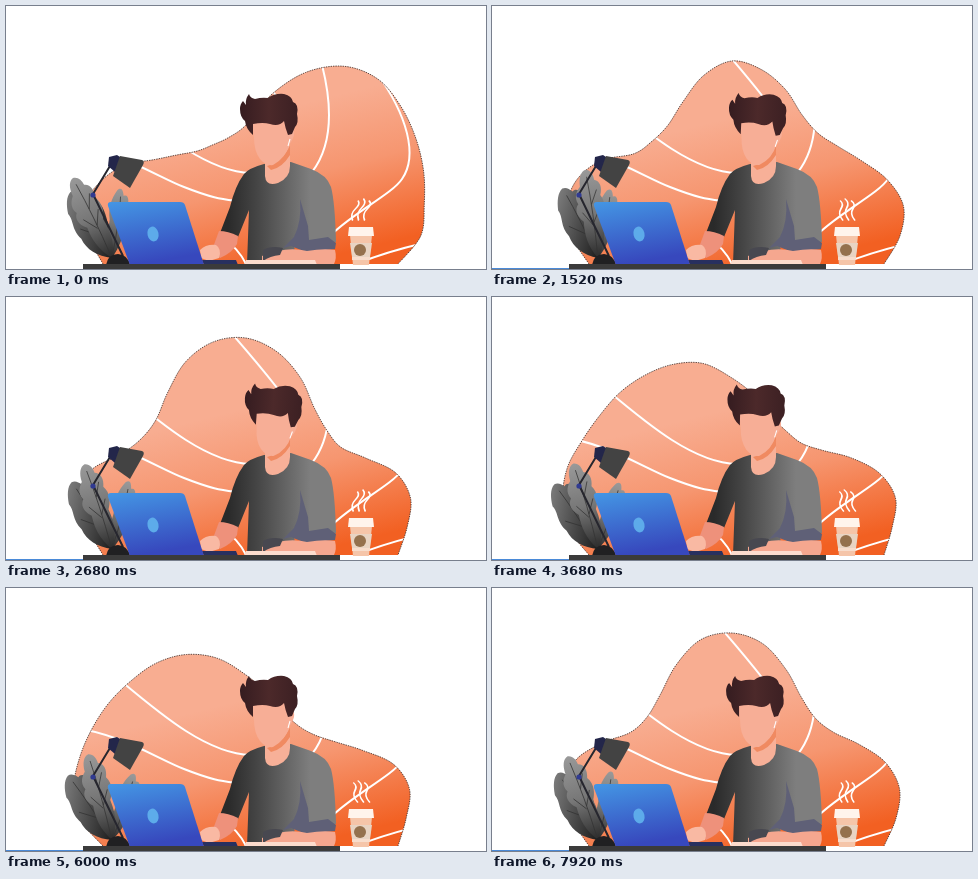
Recreate the animation shown at these times as an HTML page. Size 480x263 px, loop 8000 ms.

```html
<!DOCTYPE html>
<html lang="en">
<head>
<meta charset="utf-8">
<title>Working at a desk</title>
<style>
html, body { margin: 0; width: 100%; height: 100%; overflow: hidden; background: #fff; }
svg { display: block; width: 480px; height: 263px; }
.lines { fill: none; stroke: #fff; stroke-width: 2; }
.vein { fill: none; stroke: #333; stroke-width: .7; }
</style>
</head>
<body>
<svg viewBox="0 0 480 263">
  <defs>
    <linearGradient id="sky" gradientUnits="userSpaceOnUse" x1="225" y1="115" x2="262" y2="266">
      <stop offset="0" stop-color="#f8ad91"/><stop offset=".45" stop-color="#f69670"/><stop offset="1" stop-color="#f26022"/>
    </linearGradient>
    <linearGradient id="shirt" gradientUnits="userSpaceOnUse" x1="222" y1="0" x2="304" y2="0">
      <stop offset="0" stop-color="#2a2a2a"/><stop offset=".35" stop-color="#454545"/><stop offset="1" stop-color="#7e7e7e"/>
    </linearGradient>
    <linearGradient id="screen" x1="0" y1="0" x2=".25" y2="1">
      <stop offset="0" stop-color="#4496e4"/><stop offset="1" stop-color="#3748bd"/>
    </linearGradient>
    <linearGradient id="hair">
      <stop offset="0" stop-color="#351c20"/><stop offset=".5" stop-color="#4c292a"/><stop offset="1" stop-color="#3c2023"/>
    </linearGradient>
    <linearGradient id="dark" x1="0" y1="0" x2=".5" y2="1">
      <stop offset="0" stop-color="#8a8a8a"/><stop offset="1" stop-color="#1e1e1e"/>
    </linearGradient>
    <linearGradient id="light" x1="0" y1="0" x2="0" y2="1">
      <stop offset="0" stop-color="#999"/><stop offset=".5" stop-color="#777"/><stop offset="1" stop-color="#2a2a2a"/>
    </linearGradient>
    <clipPath id="clip"><path id="mask"/></clipPath>
  </defs>

  <g clip-path="url(#clip)">
    <rect width="480" height="258" fill="url(#sky)"/>
    <g class="lines">
      <path d="M98 79C140 113 195 166 245 167H258"/>
      <path d="M60 139C110 143 150 170 178 181S215 193 230 195"/>
      <path d="M220 30Q250 64 272 92"/>
      <path d="M315 55C327 100 326 140 306 166"/>
      <path d="M370 66C402 110 412 150 396 173C386 188 350 205 326 228"/>
      <path d="M340 262Q375 247 418 237"/>
      <path d="M215 230Q233 243 240 258"/>
    </g>
  </g>
  <path id="edge" fill="none" stroke="#3a2723" stroke-width=".8" stroke-dasharray="1.4 1"/>

  <g id="left">
    <path fill="url(#dark)" d="M106 252C94 243 88 232 89 220C85 207 92 200 90 192C93 183 97 176 103 174C107 174 109 177 111 181C116 178 121 186 120 194C126 200 122 213 119 222C119 236 113 246 106 252Z"/>
    <path class="vein" d="M106 250Q106 205 104 182M106 222L117 205M106 226L93 211"/>
  </g>
  <g id="right">
    <path fill="url(#light)" d="M106 252C97 238 99 226 99 214C96 203 98 193 103 184C107 180 109 184 110 189C115 186 117 195 114 203C118 214 114 238 106 252Z"/>
    <path class="vein" d="M106 250Q109 212 107 190"/>
  </g>
  <g id="mid">
    <path fill="url(#light)" d="M106 252C97 238 96 226 97 214C90 207 90 200 94 196C90 188 95 182 98 179C98 170 101 164 106 163C111 164 113 169 113 174C119 176 120 183 117 190C122 198 119 207 115 213C117 231 114 241 106 252Z"/>
    <path class="vein" d="M106 250Q108 206 106 170M107 216L115 202M106 219L97 205M107 198L114 184"/>
  </g>

  <path d="M107 155L87 188L117 250" fill="none" stroke="#26262e" stroke-width="2"/>
  <path d="M103 151L111 149L117 153L109 166L102 160Z" fill="#23264a"/>
  <path d="M114 150L136 154Q139 155 137 159L124 182L107 170Z" fill="#434343"/>
  <circle cx="87" cy="189" r="2.6" fill="#303a91"/>
  <path d="M100 259Q102 248 112 248Q122 249 124 259Z" fill="#202022"/>

  <path fill="url(#shirt)" d="M258 158Q243 162 238 168Q229 180 224 201L214 227L232 231L243 204L241 258H290L288 238L330 236Q329 196 325 181Q321 169 305 163L285 156Z"/>
  <path fill="#5f6077" d="M294 193L302 220L303 234L322 231L330 237L329 243L300 246L285 240L277 242L288 231Q296 215 294 193Z"/>
  <path fill="#f7b098" d="M259 149L284 138V160Q284 172 272 177Q260 181 259 170Z"/>
  <path fill="#f08a61" d="M261 160Q277 156 284 139V149Q276 162 265 164Z"/>

  <g id="head">
    <path fill="#f7ae96" d="M246 115L282 113L284 124Q289 121 288 129Q286 136 283 138Q280 152 267 159Q260 160 254 153Q248 145 248 132Z"/>
    <path fill="url(#hair)" d="M234 103Q234 98 237 95L240 99Q239 93 243 88Q244 92 249 93Q256 91 262 92Q269 87 278 88Q286 90 287 96Q293 98 291 108Q293 117 289 121L286 128L282 129Q279 121 278 115Q273 121 264 118Q257 116 247 118L247 129Q240 123 239 115Q234 111 234 103Z"/>
    <path d="M284 133L282 140" stroke="#fff" stroke-width="1"/>
  </g>

  <path fill="#ee917b" d="M213 225Q222 225 232 230L231 238Q226 247 214 252L206 244Z"/>
  <path fill="#f9b9a3" d="M194 244Q200 238 210 239Q216 243 213 252L203 255L195 252Z"/>
  <path fill="#f5a78f" d="M256 250Q280 240 301 245Q318 242 329 244Q331 252 328 258H292L256 256Z"/>
  <path fill="#484850" d="M257 244Q265 239 277 242L274 249Q264 250 257 255Z"/>
  <path fill="#fcdccd" d="M240 254H309L311 259H238Z"/>
  <path fill="#28305f" d="M196 254H230L232 259H198Z"/>
  <path fill="url(#screen)" d="M105 196H174Q178 196 179 199L198 259H124L102 200Q101 196 105 196Z"/>
  <ellipse cx="147" cy="228" rx="5.5" ry="7.5" fill="#5dabea" transform="rotate(-12 147 228)"/>

  <path fill="#f5c5a9" d="M344 229H366L363 259H347Z"/>
  <path fill="#e8d4c3" d="M344 237H366L364 251H346Z"/>
  <path fill="#fff4ec" d="M343 221H367L368 230H342Z"/>
  <path fill="#f8ddcc" d="M346 251H364V254H346Z"/>
  <circle cx="354" cy="244" r="6" fill="#94714d"/>
  <g id="steam" fill="none" stroke="#fff" stroke-width="1.6" stroke-linecap="round">
    <path d="M349 214Q345 208 349 203T350 195"/>
    <path d="M355 214Q351 207 355 202T355 193"/>
    <path d="M361 214Q357 208 361 203T361 195"/>
  </g>

  <rect x="77" y="258" width="257" height="5" fill="#3b3b3b"/>
  <rect id="bar" y="262" width="77" height="1" fill="#4a8ad8"/>
</svg>
<script>
const LOOP = 8000, HALF = 5000, CX = 240, CY = 230;
const $ = id => document.getElementById(id);

// Time, then radii from 170 down to 10 degrees.
const shapes = [
  [0,    165,156,141,119,106, 98, 97,100,111,143,174,196,205,202,196,189,181],
  [1520, 168,165,151,128,124,128,143,163,175,169,156,140,134,139,150,165,174],
  [2080, 168,167,150,133,132,143,163,181,185,177,158,139,130,133,147,163,170],
  [2500, 167,166,147,136,138,154,175,191,195,183,163,140,127,126,141,160,168],
  [2680, 166,165,145,137,140,156,176,188,189,178,159,137,126,124,138,159,167],
  [3680, 172,175,173,173,175,175,173,166,149,133,117,110,109,119,138,157,166],
  [4000, 175,177,178,179,179,179,174,162,143,126,112,106,108,118,135,157,166],
  [4760, 177,181,188,195,200,193,176,149,121,104, 99,100,107,119,138,159,167]
];

// Time, then tilt of the left, middle and right leaf.
const tilts = [
  [0, -30, -26, 7], [1520, -25, -8, 10], [2080, -29, -20, 11],
  [2680, -29, -18, 14], [3680, -32, -16, 18], [5000, -33, -14, 20]
];

// Mixes the two rows around t; runs on past the last row.
function mix(rows, t) {
  let i = 1;
  while (i < rows.length - 1 && t > rows[i][0]) i++;
  const a = rows[i - 1], b = rows[i], k = (t - a[0]) / (b[0] - a[0]);
  return a.slice(1).map((v, n) => v + (b[n + 1] - v) * k);
}

function spline(p) {
  const at = i => p[Math.max(0, Math.min(p.length - 1, i))];
  const f = v => v.toFixed(2);
  let d = `M${p[0].map(f)}`;
  for (let i = 0; i < p.length - 1; i++) {
    const [a, b, c, e] = [at(i - 1), at(i), at(i + 1), at(i + 2)];
    const h1 = b.map((v, n) => f(v + (c[n] - a[n]) / 6));
    const h2 = c.map((v, n) => f(v - (e[n] - b[n]) / 6));
    d += `C${h1} ${h2} ${c.map(f)}`;
  }
  return d;
}

function outline(u) {
  const r = mix(shapes, u);
  const all = [r[0] * .955, ...r, r[16] * .965];
  const pts = all.map((len, i) => {
    const a = (180 - i * 10) * Math.PI / 180;
    return [CX + len * Math.cos(a), CY - len * Math.sin(a)];
  });
  return spline([[97, 258], ...pts, [392, 258]]);
}

const turn = (id, deg, x, y) => $(id).setAttribute("transform", `rotate(${deg} ${x} ${y})`);

function draw(t) {
  const u = HALF - Math.abs(HALF - t);
  const d = outline(u);
  $("mask").setAttribute("d", d + "Z");
  $("edge").setAttribute("d", d);

  const [l, m, r] = mix(tilts, u);
  turn("left", l, 106, 252);
  turn("mid", m, 106, 252);
  turn("right", r, 106, 252);

  turn("head", 2.9 * (1 - Math.cos(t * Math.PI / 1000)), 266, 165);
  const lean = -14 * Math.cos(t * 2 * Math.PI / 2400);
  $("steam").setAttribute("transform", `translate(355 204) skewX(${lean}) translate(-355 -204)`);
  $("bar").setAttribute("visibility", t < 1000 ? "hidden" : "visible");
}

const start = performance.now();
function tick() {
  draw((performance.now() - start) % LOOP);
  requestAnimationFrame(tick);
}
tick();
</script>
</body>
</html>
```
